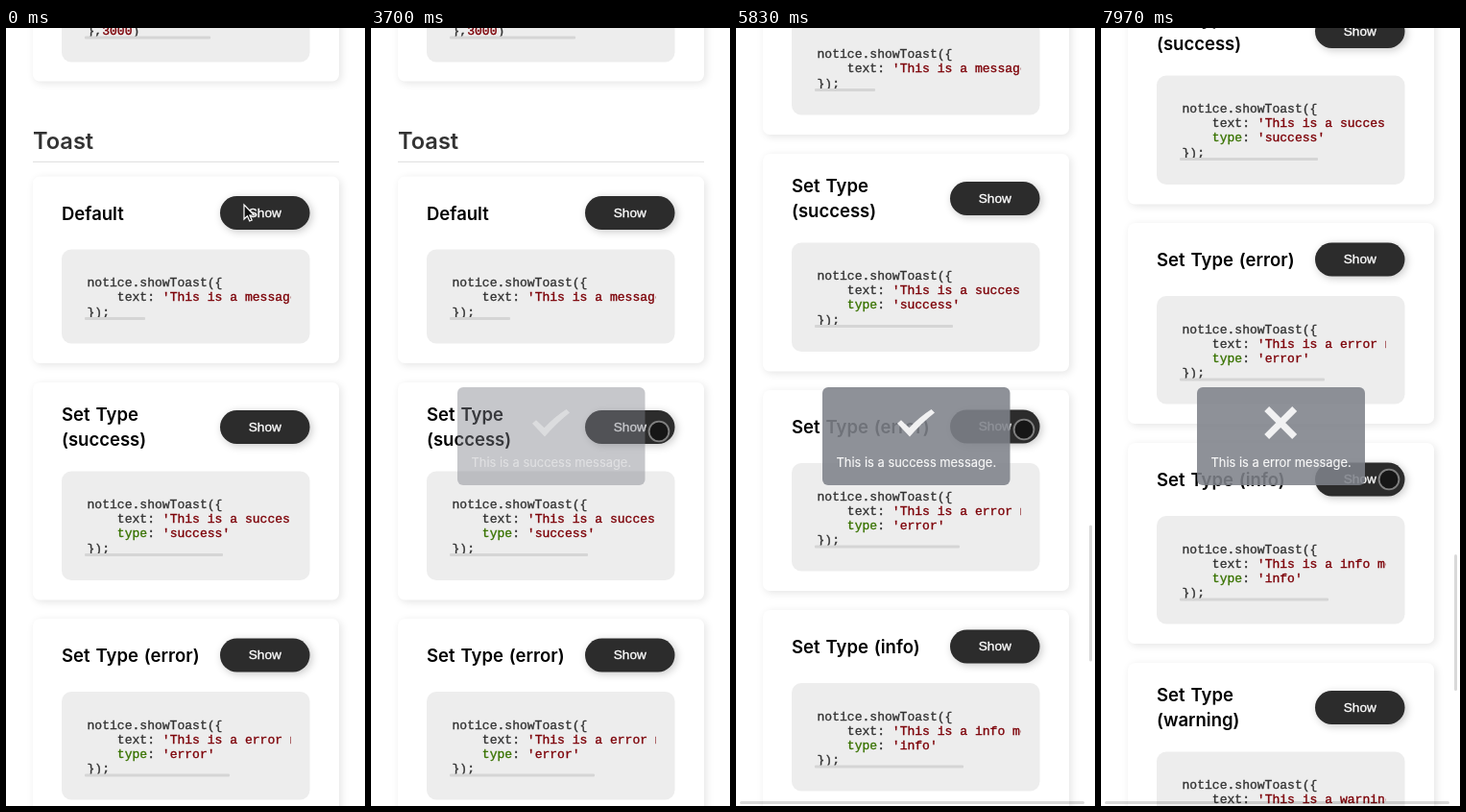
Animation, 374 px wide and 810 px high, one loop 8000 ms. Source, as an HTML page with a canvas:

```html
<!DOCTYPE html>
<html lang="en">
<head>
<meta charset="utf-8">
<title>Toast demo</title>
<style>
  html, body { margin: 0; width: 100%; height: 100%; overflow: hidden; background: #fff; }
  canvas { display: block; width: 374px; height: 810px; }
</style>
</head>
<body>
<canvas id="stage"></canvas>
<script>
const W = 374, H = 810, LOOP = 8000;
const canvas = document.getElementById('stage');
const ctx = canvas.getContext('2d');
const dpr = window.devicePixelRatio || 1;
canvas.width = W * dpr;
canvas.height = H * dpr;

const UI = 'Inter, "Noto Sans", sans-serif';
const MONO = '13.05px "Liberation Mono", "Courier New", monospace';
const CHAR = 7.83, CODE_X = 84.5;
const INK = '#333', STRING = '#7d0208', KEY = '#397300';

// Page positions: top and bottom of the card, its title and the width of the code scrollbar
const cards = [
  { top: 154.5, bottom: 349, title: ['Default'], kind: '', bar: 63 },
  { top: 369, bottom: 595.5, title: ['Set Type', '(success)'], kind: 'success', bar: 144 },
  { top: 615, bottom: 824, title: ['Set Type (error)'], kind: 'error', bar: 151 },
  { top: 844, bottom: 1053, title: ['Set Type (info)'], kind: 'info', bar: 155 },
  { top: 1073, bottom: 1300, title: ['Set Type', '(warning)'], kind: 'warning', bar: 144 }
];

const toasts = [
  { from: 1100, to: 3450, x: 113, w: 150, h: 47.5, text: 'This is a message.' },
  { from: 3600, to: 6050, x: 90, w: 195.5, h: 102, text: 'This is a success message.', icon: drawCheck },
  { from: 6250, to: 9000, x: 100, w: 175, h: 102, text: 'This is a error message.', icon: drawCross }
];

const scrollPath = [
  [4350, 0], [4570, 43], [4970, 121], [5250, 180], [5500, 222], [5700, 238],
  [7050, 238], [7150, 250], [7500, 370], [7700, 408], [7800, 412]
];
const cursorX = [[150, 248], [800, 285], [1700, 285], [2350, 308], [2500, 308], [2900, 300]];
const cursorY = [
  [150, 184], [800, 196], [1700, 196], [2350, 419], [2900, 420],
  [5000, 420], [5500, 418], [7700, 418], [7940, 470]
];

const clamp = v => Math.min(1, Math.max(0, v));
const linear = p => p;
const smooth = p => p * p * (3 - 2 * p);

function track(points, t, ease) {
  if (t <= points[0][0]) return points[0][1];
  for (let i = 1; i < points.length; i++) {
    const [t0, v0] = points[i - 1], [t1, v1] = points[i];
    if (t < t1) return v0 + (v1 - v0) * ease((t - t0) / (t1 - t0));
  }
  return points[points.length - 1][1];
}

function box(x, y, w, h, r, fill, shadow) {
  ctx.save();
  if (shadow) {
    ctx.shadowColor = `rgba(0,0,0,${shadow})`;
    ctx.shadowBlur = 8 * dpr;
    ctx.shadowOffsetX = ctx.shadowOffsetY = 2 * dpr;
  }
  ctx.fillStyle = fill;
  ctx.beginPath();
  ctx.roundRect(x, y, w, h, r);
  ctx.fill();
  ctx.restore();
}

// A thin outline gives the text the heavier smoothing of a desktop screen
function label(text, x, y, font, fill, outline = 0) {
  ctx.font = font;
  ctx.fillStyle = ctx.strokeStyle = fill;
  ctx.fillText(text, x, y);
  if (outline) {
    ctx.lineWidth = outline;
    ctx.strokeText(text, x, y);
  }
}

// Draws [text, colour] parts one after another on the character grid
function codeLine(y, ...parts) {
  let col = 0;
  for (const [text, fill] of parts) {
    label(text, CODE_X + col * CHAR, y, MONO, fill, 0.35);
    col += text.length;
  }
}

function codeBar(y, w) {
  box(82, y, w, 3, 1, '#d5d5d5');
}

function drawCode(card, top) {
  box(58, top, 258.5, card.bottom - 20.5 - top, 10, '#ededed');
  ctx.save();
  ctx.beginPath();
  ctx.rect(80, top, 217, card.bottom - top);
  ctx.clip();
  let y = top + 38.5;
  const message = `'This is a ${card.kind ? card.kind + ' ' : ''}message.'`;
  codeLine(y, ['notice.showToast({', INK]);
  codeLine(y += 15, ['    text: ', INK], [message, STRING]);
  if (card.kind) codeLine(y += 15, ['    ', INK], ['type', KEY], [': ', INK], [`'${card.kind}'`, STRING]);
  codeLine(y += 15.5, ['});', INK]);
  codeBar(y + 1.5, card.bar);
  ctx.restore();
}

function drawCard(card) {
  const extra = card.title.length > 1;
  box(28, card.top, 319, card.bottom - card.top, 7, '#fff', 0.11);
  const base = card.top + (extra ? 40 : 45);
  ctx.wordSpacing = '1.3px';
  card.title.forEach((line, i) => label(line, 58, base + i * 26, `600 18.5px ${UI}`, '#000'));
  ctx.wordSpacing = '0px';
  const btn = card.top + (extra ? 29 : 20.5);
  box(223, btn, 93.5, 35, 17.5, '#2c2c2c', 0.22);
  label('Show', 252.8, btn + 21.7, '13.6px "Liberation Sans", Arial, sans-serif', '#fff', 0.35);
  drawCode(card, card.top + (extra ? 92.5 : 76));
}

function drawPage(scroll) {
  ctx.save();
  ctx.translate(0, -scroll);
  box(28, -140, 319, 195.5, 7, '#fff', 0.11);
  box(58, -100, 258.5, 135.5, 10, '#ededed');
  codeLine(7, ['},', INK], ['3000', STRING], [')', INK]);
  codeBar(8.5, 131);
  label('Toast', 28, 126, `600 23.6px ${UI}`, INK);
  ctx.fillStyle = '#dcdcdc';
  ctx.fillRect(28, 138.8, 319, 1);
  cards.forEach(drawCard);
  ctx.restore();
}

function drawCheck() {
  ctx.beginPath();
  ctx.moveTo(168, 411.8);
  ctx.lineTo(172, 408.3);
  ctx.lineTo(180.5, 416.3);
  ctx.quadraticCurveTo(191, 405, 203.5, 397);
  ctx.lineTo(207, 400.5);
  ctx.quadraticCurveTo(193, 411.5, 181, 425.5);
  ctx.closePath();
  ctx.fill();
}

function drawCross() {
  ctx.lineWidth = 7;
  ctx.beginPath();
  ctx.moveTo(172.7, 396.5);
  ctx.lineTo(201.7, 425.5);
  ctx.moveTo(201.7, 396.5);
  ctx.lineTo(172.7, 425.5);
  ctx.stroke();
}

function drawToast(toast, t) {
  const alpha = clamp((t - toast.from) / 200) * clamp((toast.to - t) / 150);
  if (!alpha) return;
  ctx.save();
  ctx.globalAlpha = alpha;
  box(toast.x, 374, toast.w, toast.h, 6, 'rgba(127,130,138,.88)');
  label(toast.text, toast.x + 14.5, toast.icon ? 457.3 : 403, `12.9px ${UI}`, '#f8f8f8', 0.15);
  if (toast.icon) {
    ctx.fillStyle = ctx.strokeStyle = '#f1f1f2';
    toast.icon();
  }
  ctx.restore();
}

function drawScrollbars(t, scroll) {
  const first = clamp((t - 4330) / 60) * clamp((6860 - t) / 160);
  const alpha = Math.max(first, clamp((t - 7040) / 60));
  if (!alpha) return;
  ctx.save();
  ctx.globalAlpha = alpha;
  box(4, 805, 359, 3, 1.5, 'rgba(0,0,0,.15)');
  box(368, 475.5 + scroll * 0.176, 3, 142, 1.5, 'rgba(0,0,0,.15)');
  ctx.restore();
}

function drawArrow(x, y) {
  const shape = [[0, 0], [0, 15], [3.4, 11.8], [5.8, 17], [8.2, 16], [5.9, 11], [10.5, 10.8]];
  ctx.beginPath();
  shape.forEach(([dx, dy]) => ctx.lineTo(x + dx, y + dy));
  ctx.closePath();
  ctx.fillStyle = '#111';
  ctx.strokeStyle = '#fff';
  ctx.lineWidth = 1.2;
  ctx.fill();
  ctx.stroke();
}

function disc(x, y, r) {
  ctx.beginPath();
  ctx.arc(x, y, r, 0, Math.PI * 2);
}

function drawCursor(t) {
  const x = track(cursorX, t, smooth), y = track(cursorY, t, smooth);
  if (t < 150) return drawArrow(x, y);
  disc(x, y, 9.5);
  ctx.fillStyle = 'rgba(0,0,0,.5)';
  ctx.fill();
  disc(x, y, 10.4);
  ctx.strokeStyle = 'rgba(255,255,255,.4)';
  ctx.lineWidth = 1.9;
  ctx.stroke();
}

function frame(now) {
  const t = now % LOOP;
  const scroll = track(scrollPath, t, linear);
  ctx.setTransform(dpr, 0, 0, dpr, 0, 0);
  ctx.fillStyle = '#fff';
  ctx.fillRect(0, 0, W, H);
  drawPage(scroll);
  toasts.forEach(toast => drawToast(toast, t));
  drawScrollbars(t, scroll);
  drawCursor(t);
  requestAnimationFrame(frame);
}

requestAnimationFrame(frame);
</script>
</body>
</html>
```
